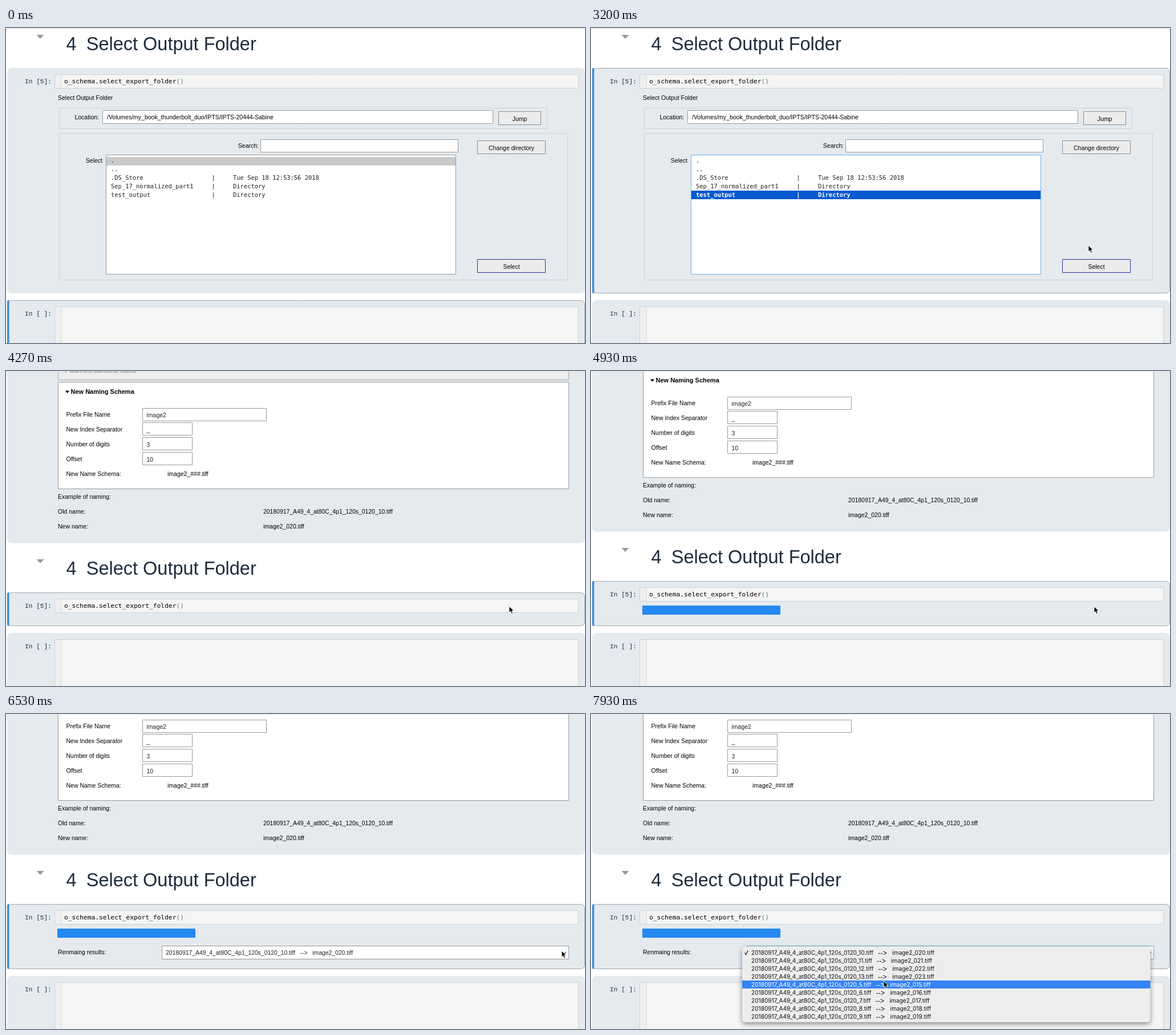
Animation, 1015 px wide and 552 px high, one loop 8 s. Source, as an HTML page with a canvas:

```html
<!DOCTYPE html>
<html lang="en">
<head>
<meta charset="utf-8">
<title>Select Output Folder</title>
<style>
html, body { margin: 0; width: 100%; height: 100%; overflow: hidden; background: #fff; }
canvas { display: block; }
</style>
</head>
<body>
<canvas id="stage" width="1015" height="552"></canvas>
<script>
const ctx = document.getElementById('stage').getContext('2d');
const LOOP = 8000, TICK = 200 / 3;
const SANS = '"Liberation Sans", Arial, sans-serif';
const MONO = '"DejaVu Sans Mono", monospace';
const COURIER = '"Liberation Mono", monospace';
const MENU = 'Inter, sans-serif';
const CELL = '#e5eaee', BLUE = '#3b8cda', GREY = '#999';

// Cursor tip over time: [ms, x, y]
const path = [
  [130, 0, 352], [330, 95, 330], [600, 216, 292], [930, 216, 292], [1000, 220, 291],
  [1200, 221, 291], [1730, 221, 291], [1870, 229, 289], [2530, 229, 288],
  [2670, 330, 252], [2800, 500, 232], [2930, 690, 272], [3070, 820, 342],
  [3200, 872, 381], [3330, 881, 392], [3400, 882, 396], [3670, 882, 412],
  [5600, 882, 413], [5870, 905, 432], [6070, 935, 439], [6400, 973, 416],
  [6530, 974, 415], [6670, 972, 416], [6930, 820, 428], [7200, 600, 440],
  [7470, 520, 448], [7730, 515, 520], [7930, 513, 468], [8000, 513, 468]
];

const menuItems = [10, 11, 12, 13, 5, 6, 7, 8, 9].map(n => [fileName(n), `image2_0${n + 10}.tiff`]);

function fileName(n) {
  return `20180917_A49_4_at80C_4p1_120s_0120_${n}.tiff`;
}

function text(s, x, mid, { size = 10.5, font = SANS, color = '#000', weight = '', align = 'left' } = {}) {
  ctx.font = `${weight} ${size}px ${font}`;
  ctx.fillStyle = color;
  ctx.textAlign = align;
  ctx.fillText(s, x, mid + size * 0.35);
  return x + ctx.measureText(s).width;
}

function box(x1, y1, x2, y2, fill, stroke, radius = 0) {
  ctx.beginPath();
  ctx.roundRect(x1, y1, x2 - x1, y2 - y1, radius);
  if (fill) { ctx.fillStyle = fill; ctx.fill(); }
  if (stroke) { ctx.strokeStyle = stroke; ctx.lineWidth = 1; ctx.stroke(); }
}

function poly(points, fill) {
  ctx.beginPath();
  points.forEach(([x, y]) => ctx.lineTo(x, y));
  ctx.closePath();
  ctx.fillStyle = fill;
  ctx.fill();
}

function shadow(color, blur = 0, dy = 0) {
  ctx.shadowColor = color;
  ctx.shadowBlur = blur;
  ctx.shadowOffsetY = dy;
}

const input = (x1, y1, x2, y2) => box(x1, y1, x2, y2, '#fff', GREY);

function button(label, x1, y1, x2, y2, border = '#8b8b8b', hover = false) {
  if (hover) shadow('rgba(0,0,0,.4)', 3, 1);
  box(x1, y1, x2, y2, '#ececec', null);
  shadow('transparent');
  box(x1, y1, x2, y2, null, border);
  text(label, (x1 + x2) / 2, (y1 + y2) / 2 + 1, { align: 'center' });
}

function cell(y1, y2, selected, prompt, codeBottom) {
  if (selected) {
    box(2.5, y1 + .5, 1014.5, y2 - .5, CELL, '#9ba5ae', 7);
    box(2, y1, 5.5, y2, BLUE, null, [3, 0, 0, 3]);
  } else {
    box(2, y1, 1015, y2, CELL, null, 8);
  }
  text(prompt, 33, y1 + 23.5, { size: 11.2, font: COURIER, color: '#1c2c44' });
  box(85.5, y1 + 11.5, 1003.5, codeBottom, '#f5f5f5', '#cdd2d6');
  box(86, y1 + 12, 97, codeBottom - .5, '#efefef');
  box(96.5, y1 + 12, 97.5, codeBottom - .5, '#d3d7da');
}

function schemaCell() {
  box(2, -200, 1015, 301.5, CELL, null, 8);
  box(91.5, -20.5, 986.5, 15.5, '#ededed', '#a5a5a5');
  text('Current Schema Name', 111, -1, { size: 11, weight: 'bold', color: '#8a8a8a' });
  poly([[104, -3], [108, 0], [104, 3]], '#8a8a8a');
  box(91.5, 19.5, 986.5, 206.5, '#fff', GREY);
  poly([[104, 34.5], [111, 34.5], [107.5, 39]], '#000');
  text('New Naming Schema', 113.5, 36.5, { size: 11, weight: 'bold' });
  const rows = [['Prefix File Name', 'image2'], ['New Index Separator', '_'], ['Number of digits', '3'], ['Offset', '10']];
  rows.forEach(([label, value], i) => {
    const y = 76.5 + i * 25.9, top = Math.round(y - 11) - .5;
    text(label, 105.5, y);
    input(239.5, top, i ? 326.5 : 456.5, top + 22);
    text(value, 246.5, y + .8, { color: '#222' });
  });
  text('New Name Schema:', 105.5, 180.3);
  text('image2_###.tiff', 283, 180.3);
  text('Example of naming:', 91, 220.5);
  text('Old name:', 91, 246.3);
  text(fileName(10), 451, 246.3, { size: 10.4 });
  text('New name:', 91, 272.2);
  text('image2_020.tiff', 451, 272.2);
}

function folderPicker(t) {
  const picked = t >= 2130;
  text('Select Output Folder', 91, 122.5);
  box(93.5, 140.5, 948.5, 176.5, null, '#cdd2d5');
  text('Location:', 163, 156.5, { align: 'right' });
  input(169.5, 144.5, 853.5, 167.5);
  text('/Volumes/my_book_thunderbolt_duo/IPTS/IPTS-20444-Sabine', 177, 156.5);
  button('Jump', 863.5, 146.5, 937.5, 169.5);
  box(93.5, 184.5, 984.5, 441.5, null, '#cdd2d5');
  text('Search:', 443, 206, { align: 'right' });
  input(446.5, 195.5, 792.5, 217.5);
  button('Change directory', 826.5, 197.5, 945.5, 220.5);
  button('Select', 826.5, 405.5, 945.5, 428.5, '#2c2f9c', t >= 3470);
  text('Select', 169, 232.5, { align: 'right' });
  box(175.5, 222.5, 788.5, 431.5, '#fff', picked ? '#6cb0e2' : GREY);

  const rows = [['.'], ['..'], ['.DS_Store', 'Tue Sep 18 12:53:56 2018'], ['Sep_17_normalized_part1', 'Directory'], ['test_output', 'Directory']];
  const current = picked ? 4 : 0;
  rows.forEach(([name, info], i) => {
    const y = 232.5 + i * 14.9, on = i === current;
    if (on) box(176, Math.round(y - 7), 788, Math.round(y + 8), picked ? '#0759d0' : '#cacaca');
    const style = {
      size: 10.45, font: MONO,
      color: on && picked ? '#fff' : '#222',
      weight: on && picked ? 'bold' : ''
    };
    text(name, 184, y, style);
    if (info) {
      text('|', 360.3, y, style);
      text(info, 398, y, style);
    }
  });
}

function results(t) {
  text('Renmaing results:', 91, 472.5);
  box(273.5, 461.5, 986.5, 484.5, '#fff', t >= 6670 ? '#6cb0e2' : GREY);
  text(`${fileName(10)}   -->   image2_020.tiff`, 280, 473.5, { size: 10.4, color: '#222' });
  poly([[975, 471], [979, 474], [983, 471], [979, 477]], '#333');
}

function menu(cursorY) {
  const current = Math.max(0, Math.min(8, Math.floor((cursorY - 411) / 14)));
  shadow('rgba(0,0,0,.45)', 9, 3);
  box(265, 408, 980.5, 540, '#ededed', null, 5);
  shadow('transparent');
  menuItems.forEach(([before, after], i) => {
    const top = 411 + i * 14, y = top + 7.5, on = i === current, color = on ? '#fff' : '#111';
    if (on) box(265, top, 980.5, top + 14, '#3683f3');
    const style = { size: 10.15, font: MENU, color };
    const end = text(before, 281, y, style);
    text('-->', end + 8, y, { size: 12.5, color });
    text(after, end + 33, y, style);
  });
  ctx.beginPath();
  ctx.moveTo(269.5, 418.5);
  ctx.lineTo(271.5, 421.5);
  ctx.lineTo(275, 414.5);
  ctx.strokeStyle = current ? '#111' : '#fff';
  ctx.lineWidth = 1.3;
  ctx.stroke();
}

function cursorAt(t) {
  const i = path.findIndex(p => p[0] > t);
  const [t1, x1, y1] = path[i - 1], [t2, x2, y2] = path[i];
  const k = (t - t1) / (t2 - t1);
  return [x1 + (x2 - x1) * k, y1 + (y2 - y1) * k];
}

function drawCursor(x, y) {
  const shape = [[0, 0], [0, 11], [2.6, 8.8], [4.4, 13], [6.5, 12.1], [4.7, 8.1], [8, 7.8]]
    .map(([dx, dy]) => [x + dx, y + dy]);
  poly(shape, '#000');
  ctx.strokeStyle = '#fff';
  ctx.lineWidth = .9;
  ctx.stroke();
}

function draw(t) {
  const picking = t < 4070, barOn = t >= 4330, done = t >= 5000;
  const scroll = picking ? -318 : done ? -55 : barOn ? -20 : 0;
  const bottom = picking ? 783 : 447 - scroll;
  const active = t >= 2270;

  ctx.fillStyle = '#fff';
  ctx.fillRect(0, 0, 1015, 552);
  ctx.save();
  ctx.translate(0, scroll);
  schemaCell();
  poly([[53.5, 330], [66.5, 330], [60, 337]], '#999');
  text('4', 105.5, 346, { size: 32.5, color: '#1d2b3c' });
  text('Select Output Folder', 140.7, 346, { size: 32.5, color: '#1d2b3c' });

  cell(388, bottom, active, 'In [5]:', 423.5);
  const code = { size: 11.25, font: MONO };
  let x = text('o_schema.select_export_folder', 102, 411, code);
  x = text('(', x, 411, { ...code, color: '#777' });
  text(')', x, 411, { ...code, color: '#3d8f62' });
  if (picking) {
    ctx.save();
    ctx.translate(0, 318);
    folderPicker(t);
    ctx.restore();
  }
  if (barOn) {
    const k = Math.min(1, (t - 4330) / 540);
    box(90, 431, 90 + 242 * k * (2 - k), 447, '#2488f0', null, 1);
  }
  if (done) results(t);
  cell(bottom + 12, bottom + 300, !active, 'In [ ]:', bottom + 280);
  ctx.restore();

  box(0, 0, 1015, 1, '#e4e4e4');
  if (t < 130) return;
  const [cx, cy] = cursorAt(t);
  if (t >= 6670) menu(cy);
  drawCursor(cx, cy);
}

const start = performance.now();
function tick() {
  const t = (performance.now() - start) % LOOP;
  // The screen refreshes fifteen times a second
  draw(Math.round(Math.floor((t + 5) / TICK) * TICK / 10) * 10 % LOOP);
  requestAnimationFrame(tick);
}
tick();
</script>
</body>
</html>
```
